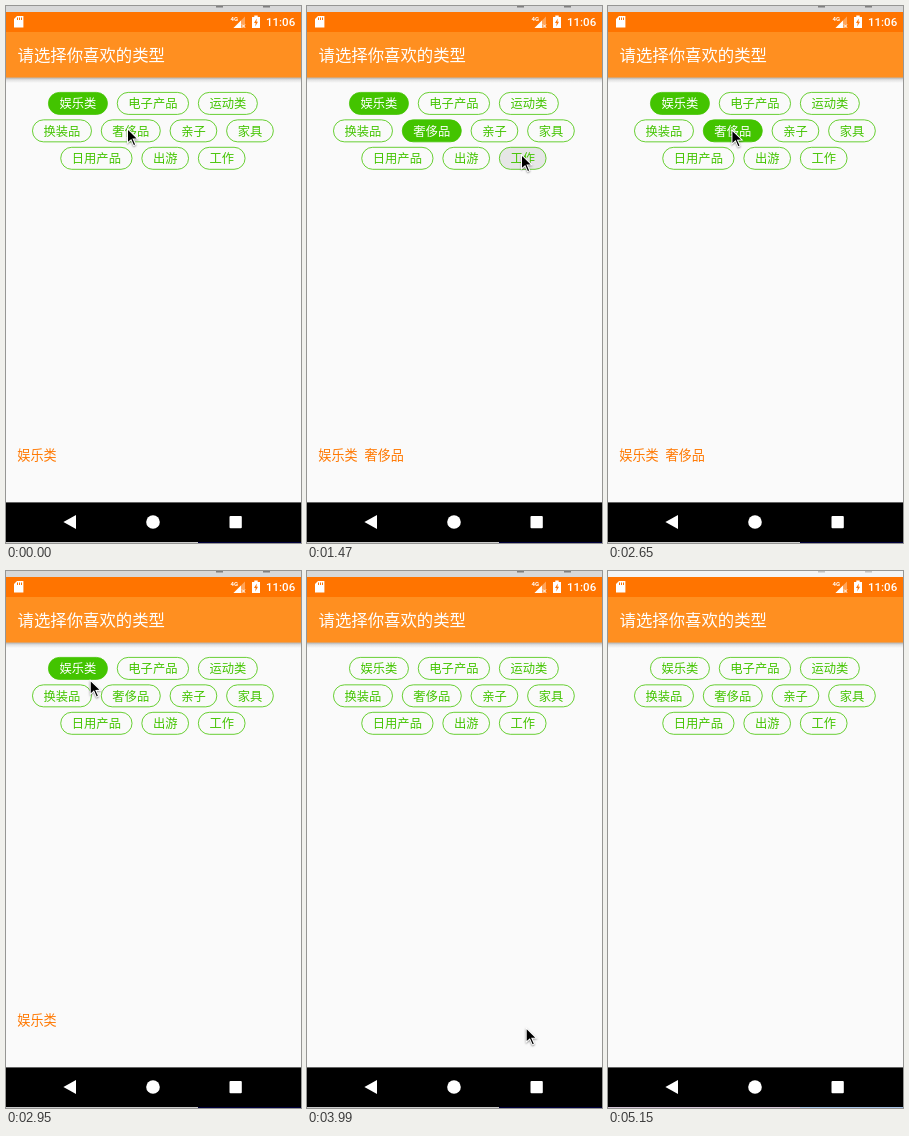
Write an HTML page with a canvas that moves like this. It is 295 px wide and 537 px high and loops after 5.25 s.

```html
<!DOCTYPE html>
<html lang="zh-CN">
<head>
<meta charset="utf-8">
<title>请选择你喜欢的类型</title>
<style>
html, body { margin: 0; width: 100%; height: 100%; overflow: hidden; background: #fafafa; }
canvas { display: block; width: 295px; height: 537px; }
</style>
</head>
<body>
<canvas id="stage" width="295" height="537"></canvas>
<script>
const ctx = document.getElementById('stage').getContext('2d');
const LOOP = 5250, STEP = 147.2, LEAD = 435, PRESS = 150;
const CJK = '"Noto Sans CJK SC", "Noto Sans CJK JP", "Noto Sans CJK", sans-serif';
const GREEN = '#43c400', ORANGE = '#ff7800', STATUS = '#ff7400';

const ROWS = [
  ['娱乐类', '电子产品', '运动类'],
  ['换装品', '奢侈品', '亲子', '家具'],
  ['日用产品', '出游', '工作']
];

// Selected tags with the time they are on; each is held down for PRESS before.
const PICKS = [
  { tag: '娱乐类', from: 0, to: 3400 },
  { tag: '奢侈品', from: 600, to: 2800 },
  { tag: '工作', from: 1620, to: 2210 }
];

// Pointer moves, each from the end of the one before; bow bends the way down.
const HOME = { x: 121, y: 122 };
const MOVES = [
  { from: 600, to: 1470, x: 214, y: 148, bow: 30 },
  { from: 1620, to: 1750, x: 210, y: 148, bow: 0 },
  { from: 2210, to: 2640, x: 125, y: 123, bow: 0 },
  { from: 2650, to: 3240, x: 74, y: 98, bow: 10 },
  { from: 3540, to: 4290, x: 240, y: 509, bow: 0 }
];
const POINTER_GONE = 4420;

function rect(x, y, w, h, color) {
  ctx.fillStyle = color;
  ctx.fillRect(x, y, w, h);
}

function poly(points, color) {
  ctx.beginPath();
  points.forEach(([x, y]) => ctx.lineTo(x, y));
  ctx.closePath();
  ctx.fillStyle = color;
  ctx.fill();
}

// Text placed by its left edge and the vertical middle of the glyph box.
function label(str, x, mid, size, color) {
  ctx.font = `400 ${size}px ${CJK}`;
  ctx.fillStyle = color;
  ctx.fillText(str, x, mid + size * 0.38);
}

function drawStatus() {
  rect(0, 5, 295, 21, STATUS);
  poly([[11, 10], [17.4, 10], [17.4, 21.6], [8, 21.6], [8, 13]], '#fff');
  for (let i = 0; i < 3; i++) rect(11 + i * 2, 11.5, 1, 2.5, STATUS);

  ctx.fillStyle = '#fff';
  ctx.font = '700 6px Roboto, sans-serif';
  ctx.fillText('4G', 224.5, 15);
  poly([[239, 10.5], [239, 22], [227.5, 22]], 'rgba(255,255,255,.35)');
  poly([[235, 14.5], [235, 22], [227.5, 22]], '#fff');
  ctx.strokeStyle = '#fff';
  ctx.lineWidth = 0.9;
  ctx.beginPath();
  ctx.moveTo(236, 18.5); ctx.lineTo(239, 21.5);
  ctx.moveTo(239, 18.5); ctx.lineTo(236, 21.5);
  ctx.stroke();

  rect(246, 11, 8, 11, '#fff');
  rect(248.3, 9.5, 3.4, 2, '#fff');
  poly([[250.8, 12.5], [248, 17], [249.7, 17], [249.2, 20.5], [252, 15.8], [250.4, 15.8]], STATUS);

  ctx.fillStyle = '#fff';
  ctx.font = '500 11.5px Roboto, sans-serif';
  ctx.fillText('11:06', 260, 20.2);
}

function drawBar() {
  rect(0, 26, 295, 45.6, '#ff8f20');
  const shade = ctx.createLinearGradient(0, 71.6, 0, 77);
  shade.addColorStop(0, 'rgba(0,0,0,.3)');
  shade.addColorStop(0.4, 'rgba(0,0,0,.1)');
  shade.addColorStop(1, 'rgba(0,0,0,0)');
  rect(0, 71.6, 295, 5.4, shade);
  label('请选择你喜欢的类型', 11.5, 48.4, 16.4, '#fff');
}

function drawTags(t) {
  const size = 12.29, pad = 11.47, gap = 9;
  const width = s => s.length * size + 2 * pad;
  ROWS.forEach((row, r) => {
    const total = row.reduce((sum, s) => sum + width(s) + gap, -gap);
    const y = 86.4 + r * 27.45;
    let x = 146.9 - total / 2;
    row.forEach(s => {
      const pick = PICKS.find(p => p.tag === s);
      const on = pick && t >= pick.from && t < pick.to;
      const pressed = pick && t >= pick.from - PRESS && t < pick.from;
      const w = width(s);
      ctx.beginPath();
      ctx.roundRect(x + 0.4, y, w - 0.8, 22, 11);
      if (on || pressed) {
        ctx.fillStyle = on ? GREEN : '#e6e6e6';
        ctx.fill();
      }
      ctx.strokeStyle = GREEN;
      ctx.lineWidth = 0.8;
      ctx.stroke();
      label(s, x + pad, y + 11, size, on ? '#fff' : GREEN);
      x += w + gap;
    });
  });
}

function drawChoice(t) {
  PICKS.filter(p => t >= p.from && t < p.to)
    .forEach((p, i) => label(p.tag, 11.3 + i * 46.3, 448.7, 13.11, ORANGE));
}

function drawNav() {
  rect(0, 496.4, 295, 41, '#000');
  poly([[57.4, 516], [70, 509], [70, 523]], '#fff');
  ctx.beginPath();
  ctx.arc(147, 516, 6.8, 0, 2 * Math.PI);
  ctx.fill();
  ctx.beginPath();
  ctx.roundRect(223.5, 510, 12.3, 12.3, 1);
  ctx.fill();
}

// Strips of the window around the phone screen.
function drawEdges(dim) {
  rect(0, 0, 295, 6, dim ? '#f4f4f4' : '#d8d8d8');
  for (const x of [210, 257]) rect(x, 0, 7, 1.5, dim ? '#c4c4c4' : '#808080');
  rect(0, 536, 192, 1, dim ? '#d5c6d8' : '#cccccc');
  rect(192, 536, 103, 1, dim ? '#a9c4e8' : '#00003c');
}

function pointerAt(t) {
  let { x, y } = HOME;
  for (const m of MOVES) {
    const p = Math.min(1, Math.max(0, (t - m.from) / (m.to - m.from)));
    const e = 1 - (1 - p) ** 2.3;
    x += (m.x - x) * e;
    y += (m.y - y) * e + m.bow * Math.sin(Math.PI * e);
    if (p < 1) break;
  }
  return [x, y];
}

function drawPointer(t) {
  if (t >= POINTER_GONE) return;
  const held = LEAD + STEP * Math.floor((t - LEAD) / STEP) + 15;
  ctx.save();
  ctx.translate(...pointerAt(held));
  ctx.shadowColor = 'rgba(0,0,0,.35)';
  ctx.shadowBlur = 2;
  ctx.shadowOffsetY = 1;
  ctx.strokeStyle = '#fff';
  ctx.lineWidth = 2;
  const arrow = [[1, 2], [1, 13.8], [4.2, 10.9], [6.9, 17], [8.1, 16.4], [5.4, 10.5], [9.6, 10.4]];
  poly(arrow, '#000');
  ctx.stroke();
  ctx.shadowColor = 'transparent';
  poly(arrow, '#000');
  ctx.restore();
}

function draw(t) {
  rect(0, 0, 295, 537, '#fafafa');
  drawStatus();
  drawBar();
  drawTags(t);
  drawChoice(t);
  drawNav();
  drawEdges(t >= 5150);
  drawPointer(t);
}

let start;
function tick(now) {
  if (start === undefined) start = now;
  draw(Math.max(0, now - start) % LOOP);
  requestAnimationFrame(tick);
}
draw(0);
requestAnimationFrame(tick);
</script>
</body>
</html>
```
